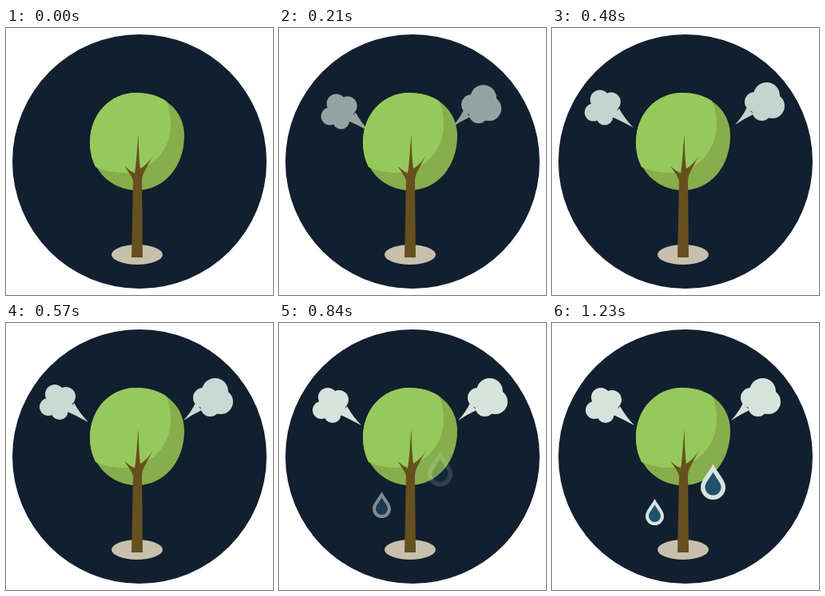
Recreate the animation shown at these times as an HTML page. Size 334 by 334 pixels, loop 2200 ms.

```html
<!DOCTYPE html>
<html lang="en">
<head>
<meta charset="utf-8">
<title>Tree transpiration</title>
<style>
  html, body { margin: 0; width: 100%; height: 100%; overflow: hidden; background: #fff; }
  svg { display: block; width: 100vw; height: 100vh; }
</style>
</head>
<body>
<svg viewBox="0 0 334 334">
  <defs>
    <path id="drop" d="M0 0C5 9 11.5 15 11.5 21.5A11.5 11.5 0 0 1-11.5 21.5C-11.5 15-5 9 0 0Z"/>
    <g id="waterDrop">
      <use href="#drop" fill="#d6e4dd"/>
      <use href="#drop" fill="#22516a" transform="translate(0 7.5) scale(.65)"/>
    </g>
  </defs>

  <circle cx="167" cy="167" r="159" fill="#111f2f"/>

  <g id="leftCloud" fill="#d6e4dd" opacity="0">
    <circle cx="61" cy="93" r="12"/>
    <circle cx="75" cy="96" r="12"/>
    <circle cx="53" cy="109" r="11"/>
    <circle cx="67" cy="114.5" r="10.5"/>
    <circle cx="70" cy="105" r="13"/>
    <path d="M77 115L85 104Q93 118 103 128Q90 121 77 115Z"/>
  </g>
  <g id="rightCloud" fill="#d6e4dd" opacity="0">
    <circle cx="263.5" cy="85.5" r="16.5"/>
    <circle cx="248.5" cy="93.5" r="12.5"/>
    <circle cx="270.5" cy="98.5" r="15.5"/>
    <circle cx="257.5" cy="105" r="12"/>
    <path d="M239 100L247 109Q234 115 224 122Q234 111 239 100Z"/>
  </g>

  <ellipse cx="164" cy="283.5" rx="32" ry="12.5" fill="#c8c0ac"/>
  <path fill="#86ae4c" d="M163 81C196 81 223 102 223 135C223 172 199 203 163 203C133 203 105 178 105 143C105 108 130 81 163 81Z"/>
  <path fill="#96c95b" d="M163 81C177 81 190 84.500 200 91C205 101 206 113 206 121C206 154 180 181 148 181C136 181 124 179 112 174C107.500 165 105 155 105 143C105 108 130 81 163 81Z"/>
  <path fill="#66501f" d="M157 287L159 191C157 184 152 179 148.500 173Q155 179 161 182C163 170 164 150 165.500 133C166 150 166.500 165 168 176Q177 171 184 159Q176 174 172 182Q170 186 170 191L171 287Z"/>

  <g id="leftDrop" opacity="0"><use href="#waterDrop"/></g>
  <g id="rightDrop" opacity="0"><use href="#waterDrop"/></g>
</svg>
<script>
const LOOP = 2200, STEP = 30;
const byId = id => document.getElementById(id);
const clamp = v => Math.max(0, Math.min(1, v));

// Knots are [time, dx, dy] relative to the resting place.
const clouds = [
  { el: byId('leftCloud'), knots: [[0, 12, 6], [120, 11, 3], [360, 10, -1], [510, -4, -4], [570, 0, -4], [750, 0, 0]] },
  { el: byId('rightCloud'), knots: [[0, -11, 4], [120, -9, 3], [360, -6, 1], [480, 5, -1], [570, -2, 0], [690, 0, 0]] }
];
const drops = [
  { el: byId('leftDrop'), x: 128.5, y: 220, scale: 1, start: 580 },
  { el: byId('rightDrop'), x: 201.5, y: 176.5, scale: 1.35, start: 760 }
];

function along(knots, t) {
  const next = knots.findIndex(k => k[0] > t);
  if (next < 0) return knots[knots.length - 1].slice(1);
  const [t0, x0, y0] = knots[next - 1], [t1, x1, y1] = knots[next];
  const p = (t - t0) / (t1 - t0);
  return [x0 + (x1 - x0) * p, y0 + (y1 - y0) * p];
}

function draw(t) {
  const fade = t > 700 ? 1 : 1 - Math.exp(-t / 190);
  for (const { el, knots } of clouds) {
    el.setAttribute('transform', `translate(${along(knots, t)})`);
    el.setAttribute('opacity', fade);
  }
  for (const { el, x, y, scale, start } of drops) {
    const p = clamp((t - start) / 470);
    el.setAttribute('transform', `translate(${x} ${y - 20 * (1 - p)}) scale(${scale})`);
    el.setAttribute('opacity', p);
  }
}

function tick() {
  draw(Math.floor(performance.now() % LOOP / STEP) * STEP);
  requestAnimationFrame(tick);
}
tick();
</script>
</body>
</html>
```
